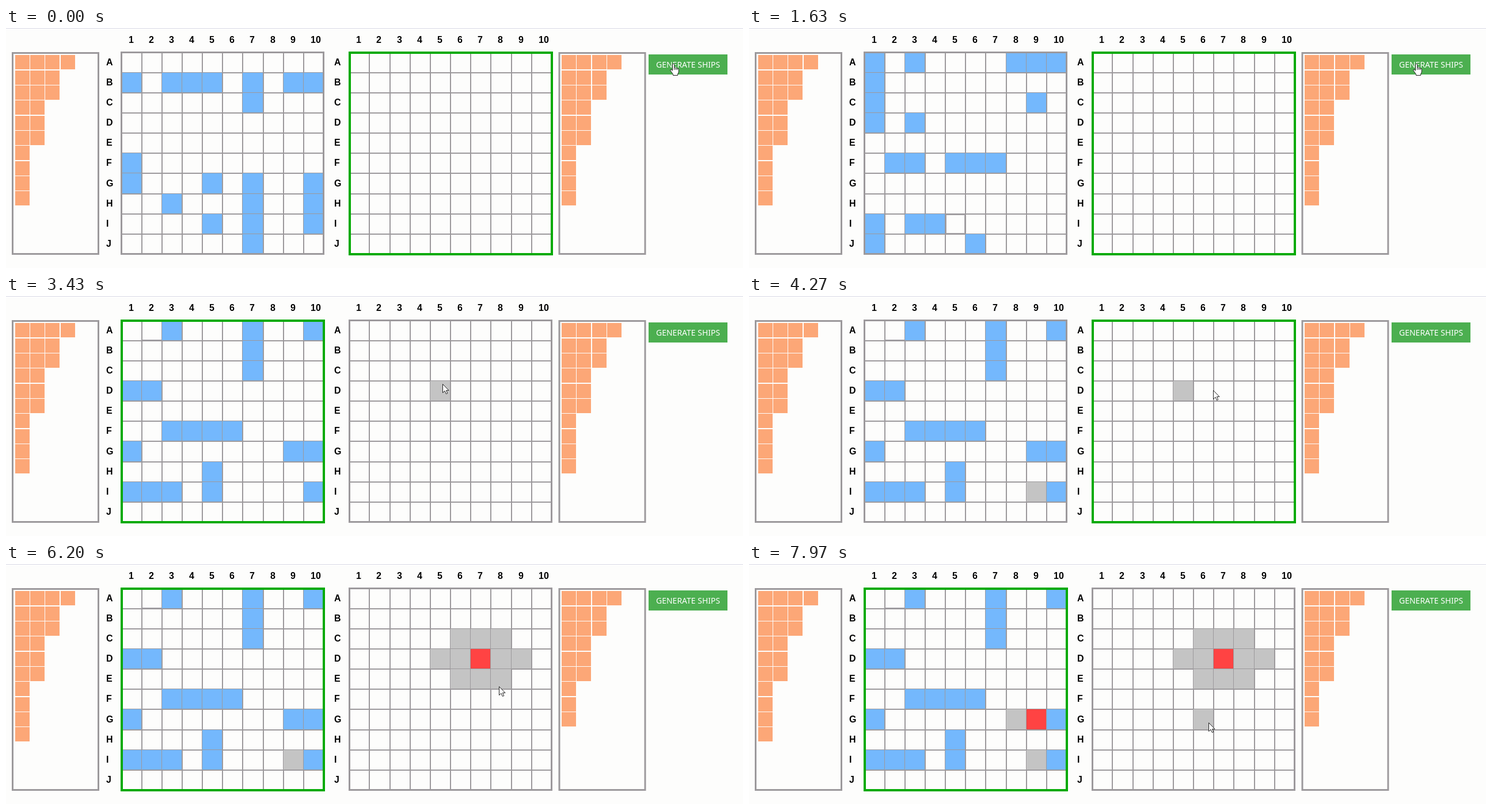
An HTML page with a canvas for the animation above (8000 ms loop, 1280 by 418 pixels).

```html
<!DOCTYPE html>
<html lang="en">
<head>
<meta charset="utf-8">
<title>Sea battle</title>
<style>
html, body { margin: 0; width: 100%; height: 100%; overflow: hidden; background: #fdfdfc; }
canvas { display: block; }
</style>
</head>
<body>
<canvas id="stage" width="1280" height="418"></canvas>
<script>
const ctx = document.getElementById('stage').getContext('2d');
const LOOP = 8000, STEP = 35.15, TOP = 42.5;
const LEFT = 200.5, RIGHT = 596.3;
const GREY = '#9c999c', GREEN = '#00aa00', BLUE = '#74b8fd', ORANGE = '#fca777',
      MISS = '#c4c4c4', HIT = '#ff4343';
const FLEET = [4, 3, 3, 2, 2, 2, 1, 1, 1, 1];

// Ship layouts by start time
const LAYOUTS = [
  [0, 'B1 B3 B4 B5 B7 B9 B10 C7 F1 G1 G5 G7 G10 H3 H7 H10 I5 I7 I10 J7'],
  [830, 'A1 A3 A8 A9 A10 B1 C1 C9 D1 D3 F2 F3 F5 F6 F7 I1 I3 I4 J1 J6'],
  [1700, 'A3 A7 A10 B7 C7 D1 D2 F3 F4 F5 F6 G1 G9 G10 H5 I1 I2 I3 I5 I10']
];

// Shots: time, board, colour, cells
const SUNK = 4530;
const SHOTS = [
  [2800, RIGHT, MISS, 'D5'],
  [3800, LEFT, MISS, 'I9'],
  [SUNK, RIGHT, MISS, 'C6 C7 C8 D6 D8 E6 E7 E8'],
  [SUNK, RIGHT, HIT, 'D7'],
  [5200, RIGHT, MISS, 'D9'],
  [6250, LEFT, HIT, 'G9'],
  [7270, LEFT, MISS, 'G8'],
  [7830, RIGHT, MISS, 'G6']
];

// Times at which the attacked board swaps, starting with the right one
const TURNS = [2800, 3800, 5200, 7270, 7830];

// Pointer: time, x, y
const POINTER = [
  [0, 1159, 62], [1780, 1159, 62], [2350, 758, 153], [3950, 758, 153],
  [4270, 806, 164], [4430, 820, 167], [4700, 820, 167], [5080, 889, 171],
  [5900, 889, 171], [6600, 806, 277], [7350, 806, 277], [7650, 798, 276], [LOOP, 798, 276]
];

const ARROW = new Path2D('M.5 .5V15.5L4 12.2L6.4 17.5L8.8 16.5L6.5 11.4H11Z');
const HAND = new Path2D('M-1.5 12V1.8a1.6 1.6 0 0 1 3.2 0V7.5q1.5-1.4 2.8 .3q1.4-1 2.6 .6' +
  'q2.2-.4 2.2 1.8V14q0 2-1.6 4v2.5H-.5V18.5L-5 12.3q-.6-2 1.2-2Z');
const KNUCKLES = new Path2D('M1.7 7.5V11M4.5 8V11M7 8.5V11');

const fillRect = (color, x, y, w, h) => {
  ctx.fillStyle = color;
  ctx.fillRect(x, y, w, h);
};

const frameRect = (color, width, x, y, w, h) => {
  ctx.strokeStyle = color;
  ctx.lineWidth = width;
  ctx.strokeRect(x, y, w, h);
};

const edge = (start, i) => Math.round(start + i * STEP);

function drawGrid(x) {
  const size = STEP * 10;
  for (let i = 1; i < 10; i++) {
    fillRect(GREY, edge(x, i) - 1, TOP, 2, size);
    fillRect(GREY, x, edge(TOP, i) - 1, size, 2);
  }
}

// Cells cover the inner half of the lines above and to the left
function fillCells(x, color, cells) {
  for (const cell of cells.split(' ')) {
    const col = cell.slice(1) - 1, row = cell.charCodeAt(0) - 65;
    const cx = edge(x, col), cy = edge(TOP, row);
    fillRect(color, cx, cy, edge(x, col + 1) - cx - 1, edge(TOP, row + 1) - cy - 1);
  }
}

function drawBorder(x, active) {
  frameRect(active ? GREEN : GREY, active ? 4 : 3, Math.floor(x) + (active ? 1 : .5),
            active ? 43 : 42.5, 351, 351);
}

function drawLabels(x) {
  ctx.font = 'bold 16px "Liberation Sans", Arial, sans-serif';
  ctx.fillStyle = '#000';
  for (let i = 0; i < 10; i++) {
    ctx.fillText(i + 1, edge(x + 12, i), 26);
    ctx.fillText('ABCDEFGHIJ'[i], Math.round(x - 26.5), edge(64.7, i));
  }
}

function drawFleet(x, ships) {
  frameRect(GREY, 3, x + 1.5, 43.5, 149, 350);
  ships.forEach((length, row) => {
    for (let col = 0; col < length; col++)
      fillRect(ORANGE, Math.round(x + 5.6 + col * 26.35), Math.round(47.3 + row * 26.35), 25, 25);
  });
}

function drawButton() {
  fillRect('#4caf50', 1116, 46, 137, 35);
  ctx.font = '14px "Noto Sans", "Open Sans", sans-serif';
  ctx.fillStyle = '#fff';
  ctx.fillText('GENERATE SHIPS', 1129, 69);
}

function drawPointer(t) {
  const i = POINTER.findIndex(p => p[0] > t);
  const [t0, x0, y0] = POINTER[i - 1], [t1, x1, y1] = POINTER[i];
  const k = (t - t0) / (t1 - t0), ease = k * k * (3 - 2 * k);
  const x = x0 + (x1 - x0) * ease, y = y0 + (y1 - y0) * ease;
  const onButton = x > 1116 && y < 81;
  const shape = onButton ? HAND : ARROW;
  ctx.save();
  ctx.translate(Math.round(x), Math.round(y));
  ctx.fillStyle = '#fff';
  ctx.strokeStyle = '#222';
  ctx.lineWidth = 1;
  ctx.fill(shape);
  ctx.stroke(shape);
  if (onButton) ctx.stroke(KNUCKLES);
  ctx.restore();
}

function draw(t) {
  fillRect('#fdfdfc', 0, 0, 1280, 418);
  fillRect('#d9d9e6', 0, 0, 1280, 1);

  const layout = LAYOUTS.filter(l => l[0] <= t).length - 1;
  const leftActive = TURNS.filter(s => s <= t).length % 2 === 1;
  [LEFT, RIGHT].forEach(drawGrid);
  fillCells(LEFT, BLUE, LAYOUTS[layout][1]);
  for (const [time, board, color, cells] of SHOTS)
    if (t >= time) fillCells(board, color, cells);
  drawBorder(LEFT, leftActive);
  drawBorder(RIGHT, !leftActive);
  [LEFT, RIGHT].forEach(drawLabels);
  if (layout === 1) frameRect('#aaa7aa', 1, 342.5, 325.5, 32, 32);
  if (layout === 2) fillRect('#a3a0a8', 237, 76, 33, 1);

  drawFleet(10, FLEET);
  drawFleet(959.5, t < SUNK ? FLEET : FLEET.slice(0, -1));
  drawButton();
  drawPointer(t);
}

const start = performance.now();
function tick() {
  draw((performance.now() - start) % LOOP);
  requestAnimationFrame(tick);
}
tick();
</script>
</body>
</html>
```
